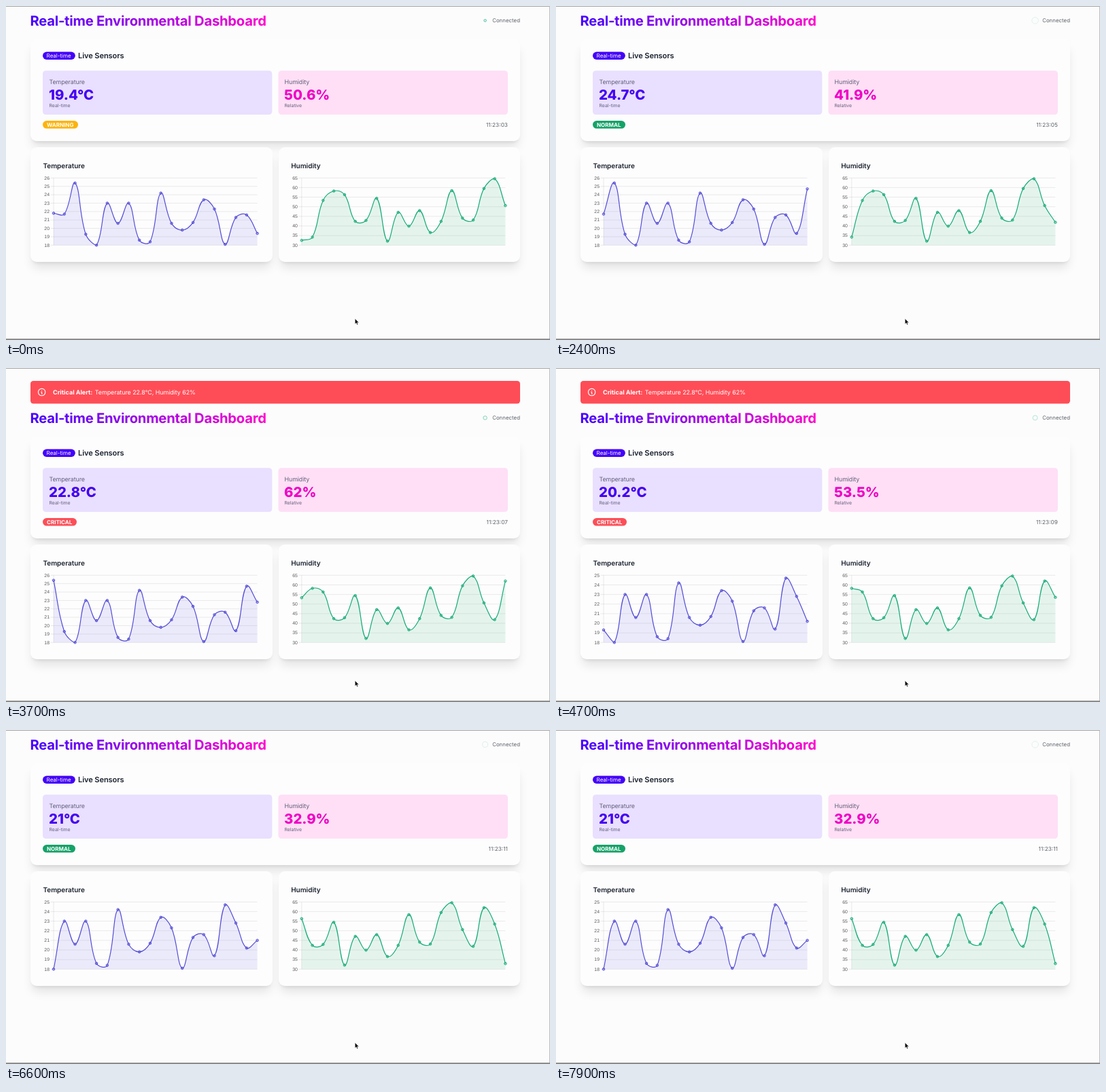
An HTML page for the animation above (8000 ms loop, 800 by 492 pixels).

```html
<!DOCTYPE html>
<html lang="en">
<head>
<meta charset="utf-8">
<title>Dashboard</title>
<style>
html, body { margin: 0; width: 100%; height: 100%; overflow: hidden; background: #fcfcfc; }
#stage { position: absolute; left: 0; top: 0; width: 800px; height: 492px; overflow: hidden; }
#app { position: absolute; left: 0; top: 0; width: 800px; height: 492px; }
.card {
  position: absolute; border-radius: 9px; background: #fdfdfd;
  box-shadow: 0 11.5px 14.4px -2.9px rgba(0,0,0,.1), 0 4.6px 5.8px -3.5px rgba(0,0,0,.1);
}
svg { position: absolute; left: 0; top: 0; overflow: visible; }
text { font-family: Inter, "Noto Sans", sans-serif; text-rendering: geometricPrecision; white-space: pre; }
.axis text { font-family: "Liberation Sans", Arial, sans-serif; font-size: 6.9px; fill: #5c5c5c; text-anchor: end; }
.label { font-size: 8.9px; letter-spacing: -.1px; fill: #62607a; }
.hint { font-size: 6.9px; fill: #62607a; }
.value { font-size: 20.3px; font-weight: 800; }
.head { font-size: 10px; font-weight: 600; letter-spacing: -.05px; fill: #1b2230; }
.meta { font-size: 7.9px; fill: #5f646c; text-anchor: end; }
.badge { font-size: 8px; font-weight: 700; fill: #fff; }
</style>
</head>
<body>
<div id="stage">
  <div id="app">
    <div class="card" style="left:36px;top:49px;width:720px;height:149.5px"></div>
    <div class="card" style="left:36px;top:208px;width:355.5px;height:168.5px"></div>
    <div class="card" style="left:400.5px;top:208px;width:355.5px;height:168.5px"></div>
    <svg width="800" height="492">
      <defs>
        <linearGradient id="brand" gradientUnits="userSpaceOnUse" x1="36" y1="0" x2="383" y2="0">
          <stop offset="0" stop-color="#4400ff"/><stop offset="1" stop-color="#ff00cf"/>
        </linearGradient>
      </defs>
      <text x="35.4" y="29.1" font-size="20.2" font-weight="700" letter-spacing="-.23" fill="url(#brand)">Real-time Environmental Dashboard</text>
      <circle id="ping" cx="704.6" cy="21.4" r="2" fill="none" stroke="#22b38c"/>
      <text class="meta" x="756" y="24.3">Connected</text>

      <rect x="54" y="67.5" width="47.8" height="11.5" rx="5.75" fill="#4300fa"/>
      <text x="59.6" y="76.1" font-size="8" fill="#fff">Real-time</text>
      <text x="106" y="77.4" font-size="11.1" font-weight="600" letter-spacing="-.1" fill="#1b2230">Live Sensors</text>

      <rect x="54" y="95.2" width="337.3" height="64.8" rx="4.6" fill="#e9dfff"/>
      <text class="label" x="63.5" y="114.8">Temperature</text>
      <text id="temp" class="value" x="63" y="138" fill="#4300f2"></text>
      <text class="hint" x="63.5" y="148.7">Real-time</text>

      <rect x="400.5" y="95.2" width="337.5" height="64.8" rx="4.6" fill="#fedff6"/>
      <text class="label" x="409.5" y="114.8">Humidity</text>
      <text id="hum" class="value" x="409.1" y="138" fill="#f000c6"></text>
      <text class="hint" x="409.5" y="148.7">Relative</text>

      <rect id="pill" x="54" y="169.1" height="11.5" rx="5.75"/>
      <text id="status" class="badge" x="60" y="177.8"></text>
      <text id="clock" class="meta" x="738" y="177.9" style="font-size:8.3px"></text>

      <text class="head" x="54.5" y="238.6">Temperature</text>
      <text class="head" x="419.2" y="238.6">Humidity</text>
      <g id="tempChart"></g>
      <g id="humChart"></g>
    </svg>
  </div>
  <svg width="800" height="492">
    <g id="alert">
      <rect x="36" y="19" width="720" height="33.5" rx="4.2" fill="#ff4d57"/>
      <g fill="none" stroke="#fff" stroke-width="1.1" stroke-linecap="round">
        <circle cx="52.6" cy="35.6" r="5.2"/>
        <path d="M52.6 33.2v.01M52 35.4h.6v2.6h.6"/>
      </g>
      <text x="69" y="39" font-size="9" font-weight="700" fill="#fff">Critical Alert:</text>
      <text x="130.8" y="39" font-size="8.9" letter-spacing="-.05" fill="#fff">Temperature 22.8°C, Humidity 62%</text>
    </g>
    <path d="M0 .5H800" stroke="#a6a4a4"/>
    <path d="M799.5 0V492" stroke="#bdbdbd"/>
    <path d="M0 491H800" stroke="#8c8c8c" stroke-width="2"/>
    <path d="M513.2 460.4v8.2l1.9-1.7 1.2 2.8 1.4-.6-1.2-2.7h2.5z" fill="#000" stroke="#fff" stroke-width=".6"/>
  </svg>
</div>
<script>
const LOOP = 8000, SHIFT = 52, POINTS = 20, TOP = 253.3, BOTTOM = 352.3;
const $ = id => document.getElementById(id);

const temps = [21.8, 21.7, 25.4, 19.3, 18, 23, 20.6, 23, 18.6, 18.4, 24.2, 20.6,
  19.8, 20.7, 23.4, 22.3, 18.1, 21.3, 21.6, 19.4, 24.7, 22.8, 20.2, 21];
const hums = [32.5, 34.2, 53.3, 58.2, 56.3, 42.4, 42.9, 54.4, 32.1, 47.1, 39.9, 48,
  36.6, 42.4, 58.4, 44.1, 43.1, 59.5, 64.6, 50.6, 41.9, 62, 53.5, 32.9];

const WARNING = ['WARNING', 52, '#fcb40c'];
const NORMAL = ['NORMAL', 48, '#16a268'];
const CRITICAL = ['CRITICAL', 50, '#fc4f58'];
const readings = [
  { at: 0, clock: '11:23:03', status: WARNING },
  { at: 700, clock: '11:23:05', status: NORMAL },
  { at: 2500, clock: '11:23:07', status: CRITICAL },
  { at: 4300, clock: '11:23:09', status: CRITICAL },
  { at: 6150, clock: '11:23:11', status: NORMAL }
];
const alertSpan = { from: 2500, rise: 333, leave: 6150, gone: 6450 };

const clamp = (v, lo, hi) => Math.min(hi, Math.max(lo, v));
const fmt = (...n) => n.map(v => v.toFixed(2)).join(' ');

// Cardinal spline with handles scaled by neighbour distance and kept inside the plot.
function spline(pts, tension = .4) {
  const handles = pts.map((p, i) => {
    const a = pts[i - 1] || p, b = pts[i + 1] || p;
    const before = Math.hypot(p.x - a.x, p.y - a.y);
    const after = Math.hypot(b.x - p.x, b.y - p.y);
    const k = tension / (before + after);
    const handle = d => [
      clamp(p.x + d * k * (b.x - a.x), pts[0].x, pts[POINTS - 1].x),
      clamp(p.y + d * k * (b.y - a.y), TOP, BOTTOM)
    ];
    return { back: handle(-before), fore: handle(after) };
  });
  return pts.slice(1).reduce((d, p, i) =>
    d + 'C' + fmt(...handles[i].fore, ...handles[i + 1].back, p.x, p.y),
    'M' + fmt(pts[0].x, pts[0].y));
}

function drawChart(node, values, { left, right, min, max, step, color, fill }) {
  const yOf = v => BOTTOM - (v - min) / (max - min) * (BOTTOM - TOP);
  const pts = values.map((v, i) => ({ x: left + (right - left) * i / (POINTS - 1), y: yOf(v) }));
  let grid = '', labels = '';
  for (let v = min; v <= max; v += step) {
    const y = yOf(v);
    grid += `M${left - 4.6} ${y.toFixed(2)}H${right}`;
    labels += `<text x="${left - 6}" y="${(y + 2.3).toFixed(2)}">${v}</text>`;
  }
  const line = spline(pts);
  const dots = pts.map(p => `<circle cx="${p.x.toFixed(2)}" cy="${p.y.toFixed(2)}" r="1.75"/>`).join('');
  node.innerHTML = `
    <path d="${grid}M${left} ${TOP}V${BOTTOM}" stroke="#000" stroke-opacity=".1" stroke-width=".8"/>
    <g class="axis">${labels}</g>
    <path d="${line}V${BOTTOM}H${left}Z" fill="${fill}"/>
    <path d="${line}" fill="none" stroke="${color}" stroke-width="1.2"/>
    <g fill="${color}" fill-opacity=".3" stroke="${color}">${dots}</g>`;
}

function showReading(n) {
  const r = readings[n], last = n + POINTS - 1;
  const [name, width, color] = r.status;
  const t = temps.slice(n, n + POINTS), h = hums.slice(n, n + POINTS);
  $('temp').textContent = temps[last] + '°C';
  $('hum').textContent = hums[last] + '%';
  $('clock').textContent = r.clock;
  $('status').textContent = name;
  $('pill').setAttribute('width', width);
  $('pill').setAttribute('fill', color);
  drawChart($('tempChart'), t, {
    left: 70, right: 369.6, min: 18, max: Math.ceil(Math.max(...t)), step: 1,
    color: '#534cd6', fill: 'rgba(79,70,229,.1)'
  });
  drawChart($('humChart'), h, {
    left: 434.8, right: 734.4, min: 30, max: 65, step: 5,
    color: '#17ab78', fill: 'rgba(16,170,100,.1)'
  });
}

function showAlert(t) {
  const { from, rise, leave, gone } = alertSpan;
  const open = t >= from && t < gone;
  const k = t < leave ? clamp((t - from) / rise, 0, 1) : clamp((gone - t) / (gone - leave), 0, 1);
  const p = open ? 1 - (1 - k) ** 2 : 0;
  $('alert').setAttribute('opacity', p);
  $('alert').setAttribute('transform', `translate(0 ${50 * (p - 1)})`);
  $('app').style.top = (open ? SHIFT : 0) + 'px';
}

function showPing(t) {
  const k = Math.min(1, t % 900 / 675);
  const e = 1 - (1 - k) ** 2.4;
  $('ping').setAttribute('r', 1.7 + 3.1 * e);
  $('ping').setAttribute('stroke-opacity', Math.max(.13, .9 - e));
}

let shown = -1;
function render(now) {
  const t = now % LOOP;
  const n = readings.filter(r => r.at <= t).length - 1;
  if (n !== shown) showReading(shown = n);
  showAlert(t);
  showPing(t);
}

const start = performance.now();
function tick() {
  render(performance.now() - start);
  requestAnimationFrame(tick);
}
tick();
</script>
</body>
</html>
```
